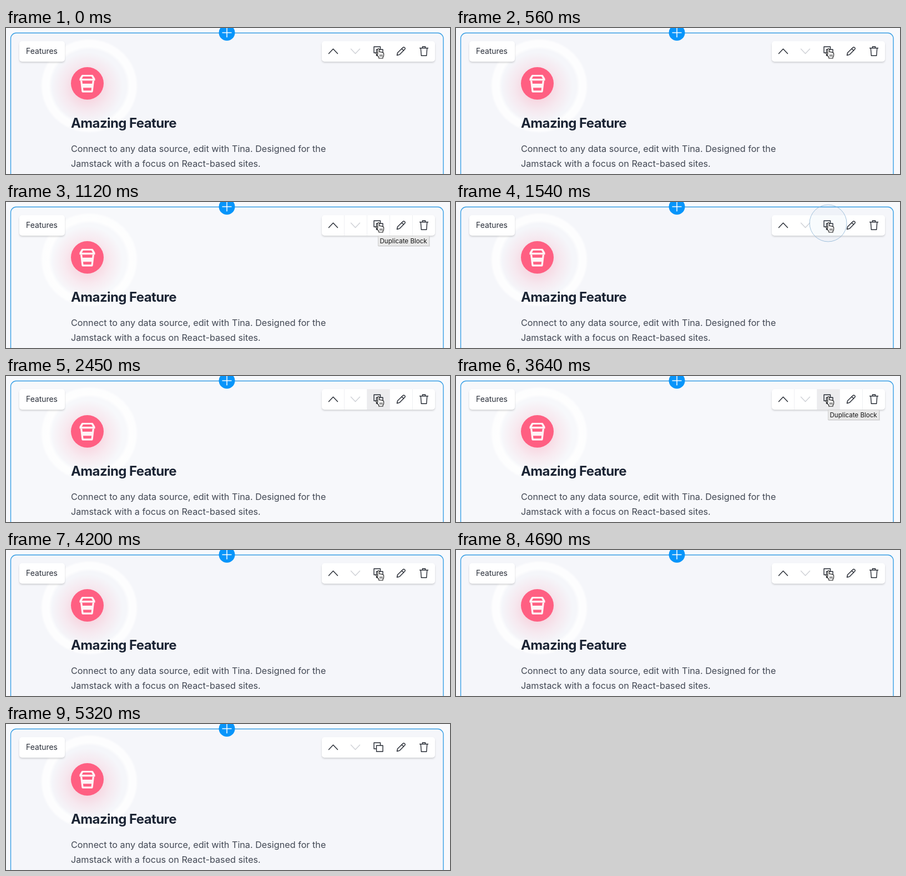
Animation, 800 px wide and 265 px high, one loop 5390 ms. Source, as an HTML page:

```html
<!DOCTYPE html>
<html lang="en">
<head>
<meta charset="utf-8">
<title>Duplicate Block</title>
<style>
  html, body { margin: 0; width: 100%; height: 100%; overflow: hidden; background: #f8f9fc; }
  svg { display: block; width: 800px; height: 265px; font-family: Inter, sans-serif; }
  .card { fill: #fff; filter: drop-shadow(0 2px 1.5px #00000026); }
  .icon { fill: none; stroke: #252a33; stroke-width: 1.4; stroke-linecap: round; stroke-linejoin: round; }
</style>
</head>
<body>
<svg viewBox="0 0 800 265">
  <defs>
    <radialGradient id="halo">
      <stop offset=".76" stop-color="#fff" stop-opacity="0"/>
      <stop offset=".83" stop-color="#fff" stop-opacity=".85"/>
      <stop offset=".95" stop-color="#fff" stop-opacity=".8"/>
      <stop offset="1" stop-color="#fff" stop-opacity="0"/>
    </radialGradient>
    <radialGradient id="glow">
      <stop offset=".3" stop-color="#ff5f82" stop-opacity=".22"/>
      <stop offset=".65" stop-color="#ff5f82" stop-opacity=".09"/>
      <stop offset="1" stop-color="#ff5f82" stop-opacity="0"/>
    </radialGradient>
  </defs>

  <rect id="panel" x="8.5" y="9" width="779.500" height="280" rx="10" stroke="#389fe5" stroke-width="1.4"/>
  <circle cx="398" cy="8.5" r="14.5" fill="#0795fa"/>
  <path d="M389.500 8.500h17M398 0v17" stroke="#fff" stroke-width="1.5"/>

  <ellipse cx="150" cy="105" rx="88" ry="86" fill="url(#halo)"/>
  <circle cx="146.5" cy="108" r="64" fill="url(#glow)"/>
  <circle cx="146.5" cy="100.5" r="29.5" fill="#ff5f82"/>
  <g fill="#fff4f6" fill-rule="evenodd">
    <path d="M138 85h17q1.500 0 2 1l3.500 6v3.500h-28v-3.500l3.500-6q.5-1 2-1zM139 88l-2.300 4h19.600l-2.300-4z"/>
    <path d="M134 95.500h25l-2.300 19.500q-.2 2-2.200 2h-16q-2 0-2.200-2zM137.300 95.500l.6 5.500h17.200l.6-5.500zM138.900 108.500l.6 5h14l.6-5z"/>
  </g>

  <rect class="card" x="24" y="24" width="82" height="37" rx="5"/>
  <text x="36" y="47" font-size="13.9" fill="#2b303b">Features</text>
  <text x="117" y="181" font-size="24" font-weight="700" letter-spacing="-.6" fill="#1b2434">Amazing Feature</text>
  <g font-size="16.2" fill="#424854">
    <text x="117" y="225">Connect to any data source, edit with Tina. Designed for the</text>
    <text x="117" y="252">Jamstack with a focus on React-based sites.</text>
  </g>

  <rect class="card" x="569" y="24" width="204" height="37" rx="5"/>
  <rect id="hover" x="650" y="24" width="41.500" height="37" fill="#ececee"/>
  <path id="dividers" d="M609.500 24v37M650.500 24v37M691.500 24v37M732.500 24v37" stroke="#eff0f3"/>
  <g class="icon">
    <path d="M581.500 46.500l8-8.500 8 8.500"/>
    <path d="M621.500 38l8 8.500 8-8.500" stroke="#cfd1d6"/>
    <path d="M667 45h-4V34h11.500v5M667.500 39h11.500v11h-11.500z"/>
    <path d="M704.500 49.500l1-4.500 9.800-9.800q1.300-1.100 2.600 0l.8.800q1.200 1.300 0 2.600l-9.800 9.800zM713 37.500l3.500 3.500"/>
    <path d="M745.500 36.500h15M750.500 36v-2.200h5V36M747.300 37l1 13.300h9.400l1-13.300"/>
  </g>

  <circle id="ripple" cx="670.500" cy="38.500" fill="#7aa9cf" fill-opacity=".06" stroke="#8fb5d5"/>

  <g id="tip">
    <rect x="671" y="63" width="93" height="18" fill="#00000018"/>
    <rect x="670.500" y="61.500" width="92" height="18" fill="#e9e9e9" stroke="#cfcfcf"/>
    <text x="673.500" y="74.500" font-size="11.6" fill="#161616">Duplicate Block</text>
  </g>

  <g id="hand" transform="translate(.8 -1)" stroke="#1c1c1c" stroke-width="1.100" stroke-linejoin="round" stroke-linecap="round">
    <path fill="#fff" d="M669 49v-9q0-1.700 1.400-1.700t1.400 1.700v4.500q2.200-1.200 2.800.6 2-1 2.600.7 2.600-.6 2.600 1.700v3q0 2-1.600 3.500v2h-7.200v-2q-1.600-1.500-2.600-3.600l-2.300-3q-.6-1.400.6-1.700 1.200-.2 2.300 1.300z"/>
    <path fill="none" d="M673 49.500v3M675.100 49.500v3M677.200 49.500v3" stroke-width=".9"/>
  </g>
</svg>
<script>
const LOOP = 5390, CLICK = 1400, RIPPLE_TIME = 350;
const el = id => document.getElementById(id);
const within = (t, ...spans) => spans.some(([from, to]) => t >= from && t < to);
const show = (id, on) => el(id).style.display = on ? '' : 'none';

function draw(now) {
  const t = now % LOOP;
  const crisp = within(t, [700, CLICK], [1960, 3990]);
  el('panel').setAttribute('fill', crisp ? '#f7f8fb' : '#f5f6fa');
  show('dividers', crisp);
  show('hover', within(t, [1960, 3990]));
  show('tip', within(t, [980, CLICK], [3150, 3920]));
  show('hand', t < 4900);

  const p = (t - CLICK) / RIPPLE_TIME;
  const rippling = p >= 0 && p < 1;
  show('ripple', rippling);
  if (rippling) {
    el('ripple').setAttribute('r', 52 * (1 - (1 - p) ** 2));
    el('ripple').setAttribute('opacity', 1 - p * p);
  }
  requestAnimationFrame(draw);
}
draw(performance.now());
</script>
</body>
</html>
```
